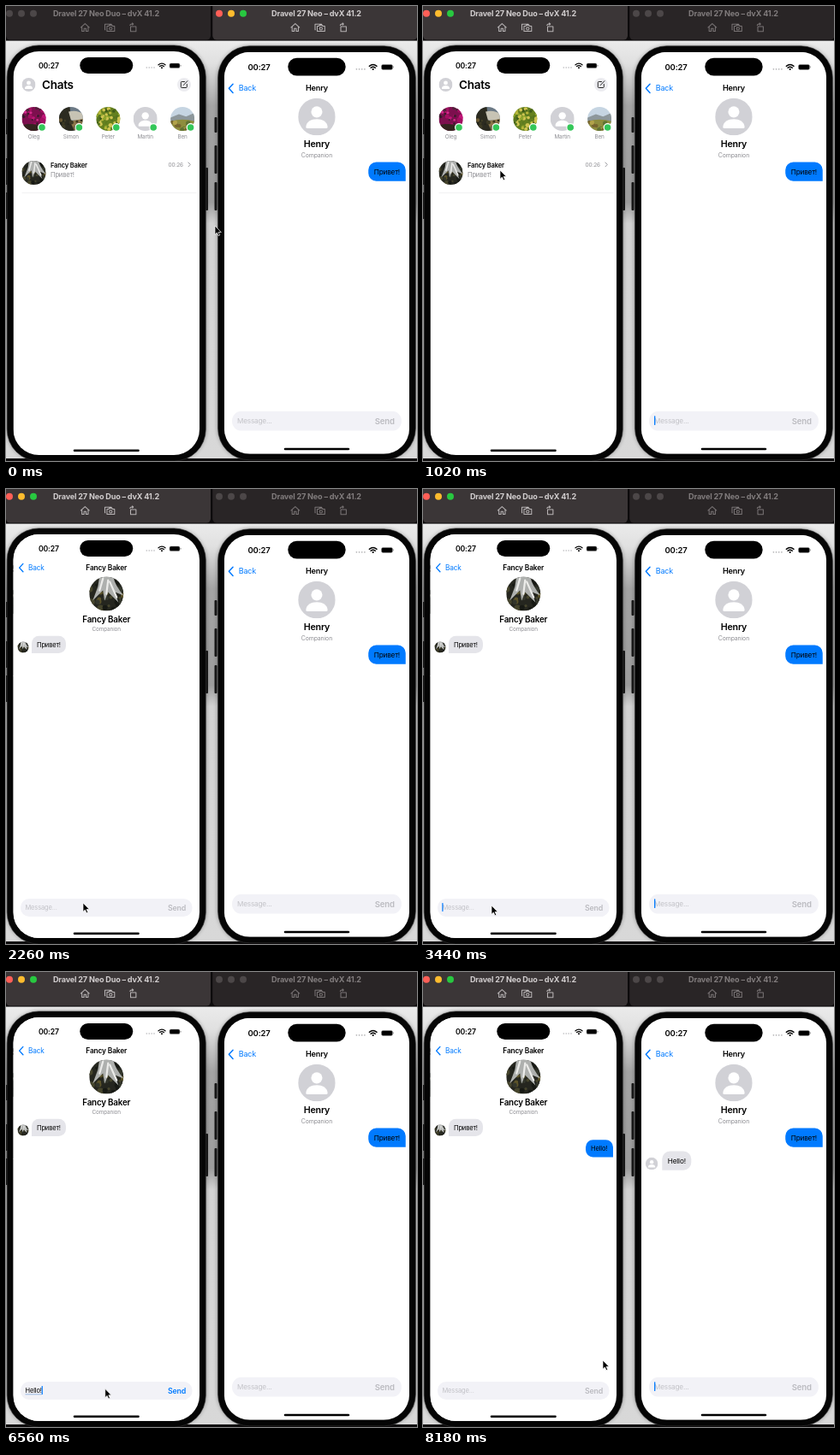
Recreate the animation shown at these times as an HTML page. Size 480 px wide and 532 px high, loop 8.24 s.

```html
<!DOCTYPE html>
<html lang="en">
<head>
<meta charset="utf-8">
<title>Two phones chatting</title>
<style>
  html, body { margin: 0; width: 100%; height: 100%; overflow: hidden; background: #000; }
  svg { display: block; width: 480px; height: 532px; }
  text { font-family: Inter, sans-serif; letter-spacing: -.02em; white-space: pre; }
  .bar { fill: #292526; }
  .heading { fill: #817c7d; }
  .light { fill: #4c4748; }
  .icons { fill: none; stroke: #787374; stroke-width: 1.1; stroke-linejoin: round; }
  .active .bar { fill: #3b3637; }
  .active .heading { fill: #d2cecf; }
  .active .icons { stroke: #b8b4b5; }
  .active .light:nth-of-type(1) { fill: #ff5f57; }
  .active .light:nth-of-type(2) { fill: #febc2e; }
  .active .light:nth-of-type(3) { fill: #28c840; }
</style>
</head>
<body>
<svg id="stage" viewBox="0 0 480 532"></svg>
<script>
const LOOP = 8240;
const BLUE = '#007aff', GRAY = '#8e8e93', PALE = '#e5e5ea';
const PEER = 'Fancy Baker', OWNER = 'Henry';
const $ = id => document.getElementById(id);
const clamp = v => Math.max(0, Math.min(1, v));
const progress = (t, start, end) => clamp((t - start) / (end - start));
const easeOut = u => u * (2 - u);

// ---------- drawing helpers ----------
const text = (x, y, string, size, attrs = '') =>
  `<text x="${x}" y="${y}" font-size="${size}" ${attrs}>${string}</text>`;
const rect = (x, y, w, h, r, fill, attrs = '') =>
  `<rect x="${x}" y="${y}" width="${w}" height="${h}" rx="${r}" fill="${fill}" ${attrs}/>`;
const circle = (x, y, r, fill, attrs = '') =>
  `<circle cx="${x}" cy="${y}" r="${r}" fill="${fill}" ${attrs}/>`;
const line = (d, color, width) =>
  `<path d="${d}" fill="none" stroke="${color}" stroke-width="${width}" stroke-linecap="round" stroke-linejoin="round"/>`;
const shape = (d, fill) => `<path d="${d}" fill="${fill}"/>`;
const BOLD = 'font-weight="600"', MID = 'text-anchor="middle"';

function speckle(seed, count, colors, top = -10) {
  const random = () => (seed = (seed * 16807) % 2147483647) / 2147483647;
  return Array.from({ length: count }, () => circle(
    (random() * 20 - 10).toFixed(1), (top + random() * (10 - top)).toFixed(1),
    (.6 + random() * 1.3).toFixed(1), colors[Math.floor(random() * colors.length)])).join('');
}

// Each portrait fills a disc of radius 10.
const portraits = {
  blank: rect(-10, -10, 20, 20, 0, '#d1d1d6') + circle(0, -2.6, 3, '#fff') +
    shape('M-5.8 5.6C-5.8 -.2 5.8 -.2 5.8 5.6Q5.8 6.2 5 6.2H-5Q-5.8 6.2 -5.8 5.6Z', '#fff'),
  flowers: rect(-10, -10, 20, 20, 0, '#7d0f4e') +
    speckle(71, 55, ['#c01578', '#a40f62', '#3b1b2c', '#d52a8c', '#51203a']) +
    shape('M-10 5Q0 3 10 6V10H-10Z', '#33251f'),
  cliff: rect(-10, -10, 20, 20, 0, '#6c7a86') + shape('M-10 -10H-1L0 0L4 10H-10Z', '#2c2b20') +
    shape('M-2 -6Q5 -8 10 -4V1H0Z', '#c7c3b4') + shape('M-1 2L10 0V10H3Z', '#8b7549') +
    speckle(19, 16, ['#3d3a24', '#6b5a35', '#1f2118'], 1),
  leaves: rect(-10, -10, 20, 20, 0, '#64801f') +
    speckle(33, 60, ['#8fa52b', '#b7b73b', '#3e5a18', '#d0c552', '#56751f']),
  meadow: rect(-10, -10, 20, 20, 0, '#c6d5e2') + shape('M-10 -1L-3 -4L3 -2L10 -5V4H-10Z', '#8d979b') +
    shape('M-10 2Q0 -1 10 2V10H-10Z', '#8e8d3d') +
    speckle(57, 22, ['#b2a24a', '#617333', '#77652f'], 2),
  frost: rect(-10, -10, 20, 20, 0, '#25261f') +
    speckle(91, 36, ['#45442c', '#171914', '#5c5329', '#33362c'], -8) +
    shape('M-4 -10H4Q5 -5 10 1L5 -1L7 5L1 -1L-1 4L-2 -2L-8 4L-5 -4Z', '#aeb0ae') +
    line('M-2 -9L-4 -2M1 -8L0 0M2 -7L6 2', '#ececea', 1.1),
};
const avatar = (kind, x, y, r) =>
  `<g transform="translate(${x} ${y}) scale(${r / 10})" clip-path="url(#disc)">${portraits[kind]}</g>`;

function bubble(x, y, w, string, sent, id = '') {
  const h = 20.3, r = 8.5;
  const left = sent ? `a${r} ${r} 0 0 1 ${-r} ${-r}` : `h${-r}v${-r}`;
  const right = sent ? `v${r}h${-r}` : `a${r} ${r} 0 0 1 ${-r} ${r}`;
  const d = `M${x + r} ${y}h${w - 2 * r}a${r} ${r} 0 0 1 ${r} ${r}v${h - 2 * r}${right}h${2 * r - w}${left}` +
    `v${2 * r - h}a${r} ${r} 0 0 1 ${r} ${-r}Z`;
  return `<g id="${id}">${shape(d, sent ? BLUE : PALE)}${text(x + 6, y + 13, string, 7.5)}</g>`;
}

// ---------- phone contents, in units of the left screen ----------
const inputBar = (p, name) => {
  const y = p.H - 46;
  return rect(8.5, y, p.W - 17, 21, 10, '#f2f2f7') +
    text(14, y + 12.7, 'Message...', 7.5, `id="${name}Hint" fill="#c2c2c7"`) +
    text(14, y + 12.7, '', 7.5, `id="${name}Draft"`) +
    rect(14, y + 14.6, 20, .6, 0, '#5b8fd0', `id="${name}Underline" opacity="0"`) +
    rect(14, y + 5, 1.2, 10, .5, BLUE, `id="${name}Caret"`) +
    text(p.W - 16, y + 13.6, 'Send', 8.8, `id="${name}Send" ${BOLD} text-anchor="end" fill="#bbbbc0"`);
};

const chat = (p, name, peer, portrait, messages) => {
  const mid = p.W / 2, inset = p.shift * .4;
  return rect(0, 0, p.W, p.H, 0, '#fff') +
    line(`M${11.4 - inset} 34.4l-4.3 4.7l4.3 4.7`, BLUE, 1.4) +
    text(17.5 - inset, 42, 'Back', 8.3, `fill="${BLUE}"`) +
    text(mid, 42, peer, 8.4, `${BOLD} ${MID}`) + avatar(portrait, mid, 69.6, 20) +
    text(mid, 102.5, peer, 9.8, `${BOLD} ${MID}`) +
    text(mid, 113, 'Companion', 6.4, `${MID} fill="${GRAY}"`) +
    messages + inputBar(p, name);
};

const friend = ([name, kind], i) => {
  const x = 24 + i * 43.4;
  return avatar(kind, x, 79, 14) + circle(x + 9.5, 89, 4.4, '#34c759', 'stroke="#fff" stroke-width="1.2"') +
    text(x, 102, name, 6.4, `${MID} fill="${GRAY}"`);
};

const chatList = p => rect(0, 0, p.W, p.H, 0, '#fff') +
  avatar('blank', 18, 39, 8) + text(33.5, 44, 'Chats', 13.5, BOLD) +
  circle(199.5, 39, 8, '#ececf0') +
  line('M200 35.5h-3.2q-1 0-1 1v5q0 1 1 1h5q1 0 1-1v-3M198.8 39.5l4.6-4.8', '#111', .9) +
  [['Oleg', 'flowers'], ['Simon', 'cliff'], ['Peter', 'leaves'], ['Martin', 'blank'], ['Ben', 'meadow']].map(friend).join('') +
  avatar('frost', 24, 142, 14) + text(43.5, 136, PEER, 7.5, BOLD) +
  text(43.5, 147, 'Привет!', 7.5, `fill="${GRAY}"`) +
  text(198.5, 134.8, '00:26', 6.5, `fill="${GRAY}" text-anchor="end"`) +
  line('M204.5 130l2.3 2.4l-2.3 2.4', GRAY, .9) +
  rect(10, 165, 204, .6, 0, '#e9e9ec');

const statusBar = p => {
  const right = p.W + p.shift, y = -p.shift * .12, home = 77 * p.W / 217.5;
  const dots = [0, 1, 2, 3].map(i => circle(right - 61.7 + i * 2.9, 19, .8, '#b5b5b8')).join('');
  return `<g transform="translate(0 ${y})">` +
    text(29.5 - p.shift * .8, 20, '00:27', 8.7, BOLD) +
    rect(p.W / 2 - 31, 7, 62, 19, 9.5, '#000') + dots +
    `<g transform="translate(${right - 44} 19.6)">` +
    line('M-4 -3.8Q0 -7 4 -3.8M-2.4 -2Q0 -3.9 2.4 -2', '#000', 1.3) + circle(0, -.4, 1, '#000') + '</g>' +
    rect(right - 35, 14, 12, 5.6, 1.7, '#000', 'stroke="#999" stroke-width=".5"') +
    rect(right - 22.4, 15.8, .8, 2, .4, '#999') + '</g>' +
    rect((p.W - home) / 2, p.H - 6.6, home, 2.5, 1.2, '#000');
};

const toolbar = p => `<g class="icons" transform="translate(${p.center} 25.3) scale(.95)">
  <path d="M-31.5 0l5.5-5l5.5 5M-29.8-1.5v6h2.6v-3.5h2.4v3.5h2.6v-6"/>
  <path d="M1-1.8h2l1-1.3h3l1 1.3h2.3v6.2H1ZM-.8 2.6h-.8v-6.8h8v1"/><circle cx="5.6" cy="1.2" r="1.7"/>
  <path d="M30-1.3h6.7v6H30ZM29.3-2.3q0-2.2 2.4-2.2h1.5m-1.3-1.4l1.5 1.4l-1.5 1.4"/></g>`;

function windowFrame(p, contents) {
  const k = p.scale, w = p.W * k, h = p.H * k, bezel = 7.3;
  const buttons = p.buttons.map(([x, y, len]) => rect(x, y, 3, len, 1, '#161616')).join('');
  const lights = [4, 18, 32].map(x => circle(p.left + x + p.lights, 8.7, 4, 'none', 'class="light"')).join('');
  return `<g id="${p.name}Window" clip-path="url(#${p.name}Clip)">
    ${rect(p.left, 38, 240, 491, 0, 'url(#backdrop)')}
    <g filter="url(#soft)" opacity=".4">${rect(p.x - bezel, p.y - 7, w + 2 * bezel, h + 14, 38, '#000')}</g>
    ${buttons}
    ${rect(p.x - bezel, p.y - 7, w + 2 * bezel, h + 14, 37, '#050505', 'stroke="#333" stroke-width=".6"')}
    <g transform="translate(${p.x} ${p.y}) scale(${k})">
      <g clip-path="url(#${p.name}Screen)">${contents}${statusBar(p)}</g>
    </g>
    ${rect(p.left, 0, 240, 40.6, 0, '#0d0b0c')}
    ${rect(p.left + p.lights / 4, -10, 239, 49.6, 5, 'none', 'class="bar"')}
    <g>${lights}</g>
    ${text(p.center, 11.6, p.title, 9.1, 'class="heading" font-weight="700" text-anchor="middle"')}
    ${toolbar(p)}</g>`;
}

const clips = p => `<clipPath id="${p.name}Clip"><rect x="${p.left}" width="240" height="532"/></clipPath>
  <clipPath id="${p.name}Screen"><rect width="${p.W}" height="${p.H}" rx="${30 / p.scale}"/></clipPath>`;

const big = {
  name: 'big', x: 8.5, y: 53, W: 217.5, H: 472, scale: 1, shift: 0, left: 0, lights: 0, center: 117,
  title: 'Dravel 27 Neo Duo – dvX 41.2', buttons: [[-1, 132, 18], [-1, 178, 31], [-1, 218, 31], [233, 189, 50]],
};
const small = {
  name: 'small', x: 254.8, y: 53.8, W: 198.8, H: 432, scale: 1.088, shift: 5, left: 240, lights: 5, center: 362.5,
  title: 'Dravel 27 Neo – dvX 41.2', buttons: [[243.5, 130, 18], [243.5, 163, 33], [243.5, 206, 33]],
};

const bigChat = chat(big, 'big', PEER, 'frost',
  avatar('frost', 11.5, 132, 6.5) + bubble(21.5, 118.8, 40, 'Привет!', false) +
  bubble(181.5, 143.3, 32, 'Hello!', true, 'sent'));
const smallChat = chat(small, 'small', OWNER, 'blank',
  bubble(154.8, 118.4, 40, 'Привет!', true) +
  `<g id="received">${avatar('blank', 11.3, 156.5, 6.7)}${bubble(22.5, 143.2, 31.3, 'Hello!', false)}</g>`);

$('stage').innerHTML = `<defs>
  <clipPath id="disc"><circle r="10"/></clipPath>${clips(big)}${clips(small)}
  <filter id="soft" x="-20%" width="140%" y="-10%" height="120%"><feGaussianBlur stdDeviation="2.5"/></filter>
  <linearGradient id="backdrop" x1="0" x2="0" y1="0" y2="1">
    <stop stop-color="#ececec"/><stop offset=".06" stop-color="#e0e0e0"/><stop offset=".16" stop-color="#a4a4a4"/>
    <stop offset=".39" stop-color="#9c9c9c"/><stop offset=".44" stop-color="#d2d2d2"/>
    <stop offset="1" stop-color="#d8d8d8"/>
  </linearGradient></defs>
  <rect width="480" height="532" fill="#0d0b0c"/>
  ${windowFrame(big, `<g id="list">${chatList(big)}</g><g id="chat">${bigChat}</g>`)}
  ${windowFrame(small, smallChat)}
  <path id="cursor" d="M0 0V10.3L2.4 8.1L4 11.7L5.7 10.9L4.1 7.5H7.3Z" fill="#000" stroke="#fff" stroke-width=".7"/>`;

// ---------- timeline ----------
const FOCUS = 760, PUSH = 1140, TAP = 3040, SEND = 7180, ARRIVE = 7330;
const keyTimes = [4700, 5080, 5300, 5780, 6000, 6270];
const cursorPath = [
  [20, 244, 257], [700, 90, 192], [1140, 90, 192], [1460, 86, 190], [1510, 86, 190], [1780, 93, 476], [2120, 90, 484],
  [2460, 90, 484], [2780, 80, 487], [6480, 80, 487], [6980, 200, 488], [7340, 200, 488], [7880, 210, 454],
];
// Spans in which each caret is dimmed out.
const bigBlinks = [[3640, 4040], [8040, 8500]];
const smallBlinks = [[-200, 440], [1140, 1340], [1960, 2460], [3050, 3340], [4060, 4460],
  [5140, 5360], [6100, 6640], [7140, 7640], [7780, 8040]];

const blink = (t, spans) => spans.reduce((alpha, [start, end]) =>
  alpha * (1 - progress(t, start, start + 120) + progress(t, end, end + 100)), 1);

function cursorAt(t) {
  const next = cursorPath.findIndex(([time]) => time > t);
  if (next === 0) return cursorPath[0].slice(1);
  if (next < 0) return cursorPath.at(-1).slice(1);
  const [t0, x0, y0] = cursorPath[next - 1], [t1, x1, y1] = cursorPath[next];
  const u = easeOut(progress(t, t0, t1));
  return [x0 + (x1 - x0) * u, y0 + (y1 - y0) * u];
}

const set = (id, name, value) => $(id).setAttribute(name, value);

function draw(t) {
  const leftFocused = t >= FOCUS;
  $('bigWindow').classList.toggle('active', leftFocused);
  $('smallWindow').classList.toggle('active', !leftFocused);

  const push = 1 - (1 - progress(t, PUSH, 1480)) ** 3;
  set('list', 'transform', `translate(${-.3 * big.W * push} 0)`);
  set('chat', 'transform', `translate(${big.W * (1 - push)} 0)`);

  const typed = t < SEND ? keyTimes.filter(time => time <= t).length : 0;
  $('bigDraft').textContent = 'Hello!'.slice(0, typed);
  set('bigHint', 'opacity', typed ? 0 : 1);
  set('bigSend', 'fill', typed ? BLUE : '#bbbbc0');
  const width = typed ? $('bigDraft').getComputedTextLength() : 0;
  set('bigUnderline', 'opacity', typed === 6 ? 1 : 0);
  set('bigUnderline', 'width', width);
  set('bigCaret', 'x', 13.8 + width);
  set('bigCaret', 'opacity', t < TAP ? 0 : blink(t, bigBlinks));
  set('smallCaret', 'opacity', blink(t, smallBlinks));

  set('sent', 'opacity', progress(t, SEND, SEND + 100));
  set('received', 'opacity', progress(t, ARRIVE, ARRIVE + 100));
  set('cursor', 'transform', `translate(${cursorAt(t)})`);
}

const start = performance.now();
function tick() {
  draw((performance.now() - start) % LOOP);
  requestAnimationFrame(tick);
}
tick();
</script>
</body>
</html>
```
